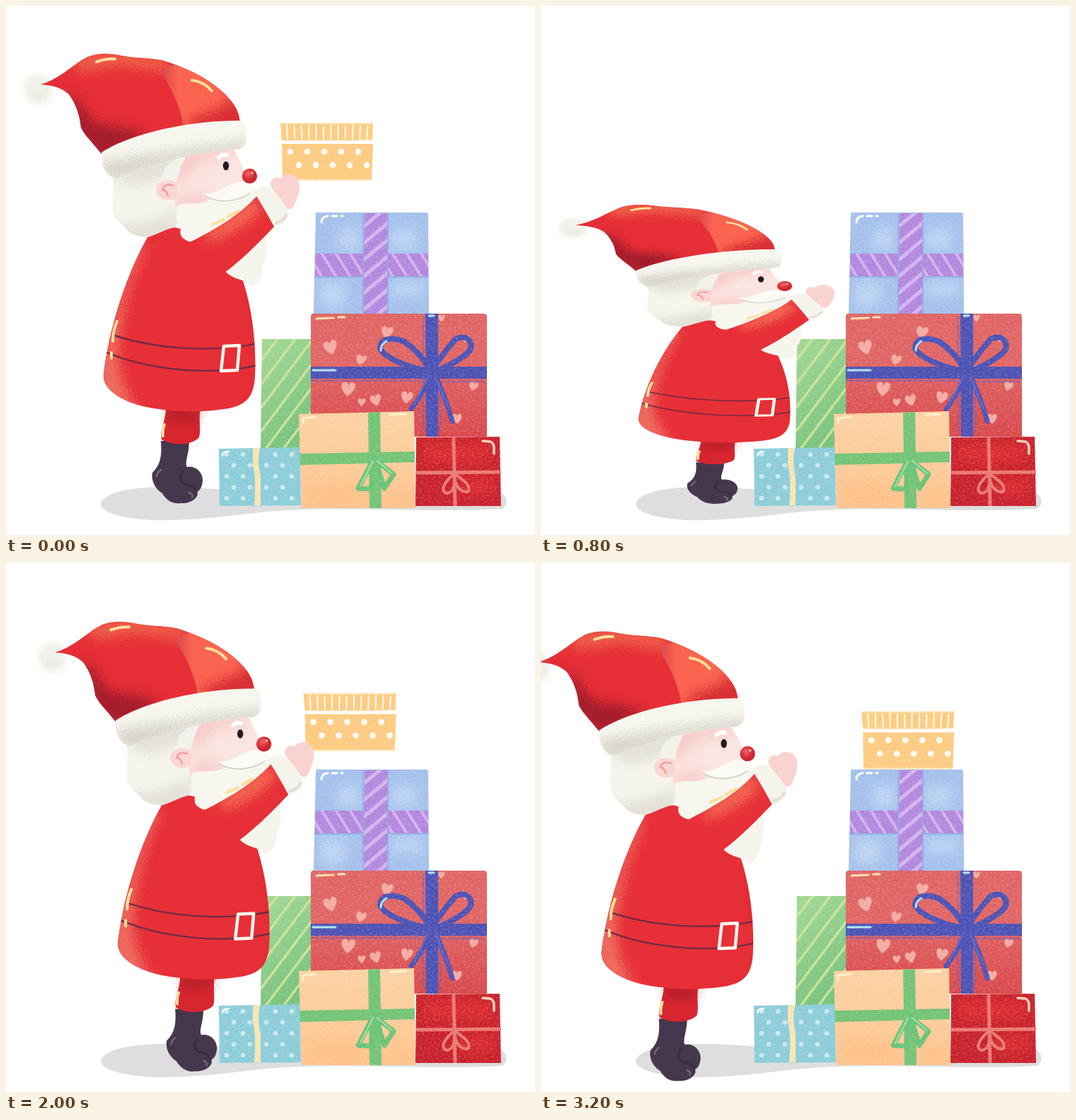
Animation, 748 px wide and 748 px high, one loop 3.4 s. Source, as an HTML page:

```html
<!DOCTYPE html>
<html lang="en">
<head>
<meta charset="utf-8">
<title>Santa stacking presents</title>
<style>
html, body { margin: 0; height: 100%; overflow: hidden; background: #fff; }
svg { display: block; width: 100vw; height: 100vh; }
.line { fill: none; stroke-linecap: round; stroke-linejoin: round; }
.shine { fill: none; stroke: #ffdf9a; stroke-width: 4; stroke-linecap: round; }
.spray { filter: url(#spray); }
.present { filter: url(#paper); }
.cutout { filter: drop-shadow(-1.3px 0 #fff) drop-shadow(0 1.3px #fff); }
</style>
</head>
<body>
<svg viewBox="0 0 748 748">
<defs>
  <filter id="spray" x="-30%" y="-30%" width="160%" height="160%" color-interpolation-filters="sRGB">
    <feGaussianBlur stdDeviation="7" result="soft"/>
    <feTurbulence type="fractalNoise" baseFrequency=".8" numOctaves="2" seed="4"/>
    <feDisplacementMap in="soft" scale="42" xChannelSelector="R" yChannelSelector="G"/>
  </filter>
  <filter id="paper" x="0" y="0" width="100%" height="100%" color-interpolation-filters="sRGB">
    <feTurbulence type="fractalNoise" baseFrequency=".35" numOctaves="3" seed="8"/>
    <feColorMatrix values="0 0 0 0 1  0 0 0 0 1  0 0 0 0 1  .5 0 0 0 -.22"/>
    <feComposite operator="in" in2="SourceGraphic" result="grain"/>
    <feMerge><feMergeNode in="SourceGraphic"/><feMergeNode in="grain"/></feMerge>
  </filter>
  <radialGradient id="pom"><stop offset=".55" stop-color="#f2f1ea"/><stop offset="1" stop-color="#f2f1ea" stop-opacity="0"/></radialGradient>
  <radialGradient id="nose" cx=".4" cy=".35"><stop offset="0" stop-color="#f0686a"/><stop offset=".6" stop-color="#e0353c"/><stop offset="1" stop-color="#c9262f"/></radialGradient>
  <linearGradient id="panel"><stop offset="0" stop-color="#d4444a"/><stop offset=".2" stop-color="#fb6450"/><stop offset=".65" stop-color="#fa6550"/><stop offset="1" stop-color="#e5393b"/></linearGradient>
  <linearGradient id="rose" x2="0" y2="1"><stop offset=".4" stop-color="#e06463"/><stop offset="1" stop-color="#d9474b"/></linearGradient>
  <linearGradient id="leaf" x2=".4" y2="1"><stop offset="0" stop-color="#a3d894"/><stop offset="1" stop-color="#78c17d"/></linearGradient>
  <linearGradient id="peach" x2="0" y2="1"><stop offset="0" stop-color="#fcd2a1"/><stop offset="1" stop-color="#fdc48f"/></linearGradient>
  <pattern id="diag" width="20" height="20" patternUnits="userSpaceOnUse" patternTransform="rotate(37)"><path d="M10 0V20" stroke="#cde595" stroke-width="3.2"/></pattern>
  <pattern id="candyV" width="18" height="18" patternUnits="userSpaceOnUse" patternTransform="translate(506 300) rotate(50)"><path d="M9 0V18" stroke="#d4b5ef" stroke-width="5"/></pattern>
  <pattern id="candyH" width="17" height="17" patternUnits="userSpaceOnUse" patternTransform="translate(437 350) rotate(-32)"><path d="M8 0V17" stroke="#d4b5ef" stroke-width="3.5"/></pattern>
  <path id="heart" d="M0 11C-13 2-11-9-5-9C-1-9 0-5 0-4C1-8 4-11 8-8C13-3 6 5 0 11Z"/>
  <path id="hat" d="M49 111C75 103 90 87 108 76C123 66 146 66 162 70C182 74 202 73 222 77C258 88 288 104 308 123C326 141 331 152 331 172L140 216C126 196 113 186 106 172C104 153 99 139 89 125C77 114 63 112 49 111Z"/>
  <path id="brim" d="M135 207C175 181 255 162 329 162C338 162 341 173 340 184C341 196 336 202 325 203C270 205 205 224 156 243C145 243 132 228 135 207Z"/>
  <path id="hair" d="M149 238C156 258 148 268 151 284C148 300 162 306 170 315C180 331 218 330 236 316C250 304 248 275 240 250L252 210Z"/>
  <path id="coat" d="M200 327C218 322 235 310 243 314L300 330L335 388C350 435 354 485 352 525C350 553 339 564 315 569C275 576 225 574 190 565C158 556 136 540 138 520C146 455 170 380 200 327Z"/>
  <path id="face" d="M250 214C275 206 300 203 322 203C328 212 334 224 337 234L338 258L290 290L240 287C236 260 238 238 250 214Z"/>
  <path id="sleeve" d="M225 345C240 330 252 335 262 333C300 314 335 292 355 268L382 309C355 337 330 364 292 389Z"/>
  <clipPath id="inHat"><use href="#hat"/></clipPath>
  <clipPath id="inBrim"><use href="#brim"/></clipPath>
  <clipPath id="inHair"><use href="#hair"/></clipPath>
  <clipPath id="inCoat"><use href="#coat"/></clipPath>
  <clipPath id="inFace"><use href="#face"/></clipPath>
  <clipPath id="inSleeve"><use href="#sleeve"/></clipPath>
  <clipPath id="residue"><path d="M0 0H748V471H297V748H0Z"/></clipPath>

  <g id="santa">
    <!-- leg -->
    <path fill="#46384c" d="M219 615L259 615C259 634 252 645 256 652C268 649 279 660 278 672C277 681 274 685 270 687C274 692 264 704 248 703C235 705 226 698 221 689C210 682 205 670 207 660C217 650 221 639 219 615Z"/>
    <path class="line" stroke="#352a3b" stroke-width="2.5" d="M250 658C244 668 246 676 257 677C263 678 268 681 269 687"/>
    <path class="line" stroke="#77677c" stroke-width="2.5" d="M259 688Q265 690 263 695M219 656Q213 661 213 665"/>
    <path fill="#d7262f" d="M226 568H275C272 588 276 598 273 610C262 622 235 622 220 613C217 598 226 588 226 568Z"/>
    <path class="spray" fill="#9c1a26" opacity=".6" d="M230 568H272V582Q250 592 230 586Z"/>
    <path class="shine" stroke-width="3" d="M224 592Q221 599 222 608"/>
    <!-- coat, beard below the arm -->
    <use href="#hair" fill="#f6f5ed"/>
    <g clip-path="url(#inHair)"><path class="spray" fill="#d5d2c8" d="M140 235L246 205L246 235L180 256ZM150 310Q200 312 245 285L240 335H165Z" opacity=".6"/></g>
    <use href="#coat" fill="#e72f37"/>
    <g clip-path="url(#inCoat)">
      <path class="spray" fill="#ee6c60" d="M185 330L130 500V555L190 575Q155 530 160 480Q168 400 198 340Z"/>
      <path class="spray" fill="#c2232e" opacity=".5" d="M345 400L360 540L335 572L354 575L368 400Z"/>
      <path class="line" stroke="#742a46" stroke-width="2.4" d="M154 466C215 486 295 490 356 477M143 490C200 514 285 524 356 508"/>
    </g>
    <path class="line" stroke="#fff6ee" stroke-width="4.5" style="fill:#e72f37" d="M308 481L330 480L327 515L304 516Z"/>
    <path class="shine" d="M157 446Q151 460 151 474M149 490V498"/>
    <path fill="#f6f5ed" d="M300 360L310 375C322 389 338 384 347 398C358 392 364 378 362 368C372 355 366 335 367 310L340 310Z"/>
    <!-- head -->
    <use href="#face" fill="#fbe5e1"/>
    <g clip-path="url(#inFace)"><path class="spray" fill="#f5b9b9" opacity=".6" d="M240 205L325 200V211L275 220L250 246L236 250ZM245 268L285 264L280 285H240Z"/></g>
    <path fill="#f3f2ea" d="M225 228Q240 212 256 210Q243 232 240 256Q230 245 216 254Z"/>
    <path fill="#fad6d2" d="M242 250C226 241 211 250 212 261C214 273 229 278 241 271Z"/>
    <path class="line" stroke="#ed9f9e" stroke-width="2.5" d="M236 254Q224 250 221 260Q226 259 229 268"/>
    <path fill="#f7f6ef" d="M242 283C256 275 275 284 290 273L350 258C365 270 350 289 330 302C305 320 280 329 262 334C248 330 245 324 247 315C238 306 243 296 242 283Z"/>
    <path fill="#fbfaf4" d="M278 264C296 270 312 250 334 248C352 249 354 260 343 266C325 280 292 278 278 264Z"/>
    <path class="line" stroke="#d9d4cc" stroke-width="2" d="M281 268C300 280 326 277 345 265"/>
    <path class="line" stroke="#fff" stroke-width="6" d="M301 214Q305 209 312 211"/>
    <ellipse cx="311" cy="226" rx="4.2" ry="6.3" fill="#241924"/>
    <circle cx="344.5" cy="240.5" r="10.6" fill="url(#nose)"/>
    <circle cx="348" cy="236" r="1.8" fill="#fbb9b5"/>
    <!-- arm -->
    <use href="#sleeve" fill="#e72f37"/>
    <g clip-path="url(#inSleeve)"><path class="spray" fill="#f46a55" d="M278 325L350 270L362 288Q335 316 288 334Z"/></g>
    <path class="shine" d="M292 309L308 302M314 298L328 290"/>
    <path fill="#f9d3d0" d="M376 258C370 248 379 239 388 244C393 235 407 236 413 246C418 257 413 269 409 278C406 286 402 289 397 286Z"/>
    <path fill="#f5f4ec" d="M351 264C356 256 368 253 375 259C387 270 398 284 400 294C398 304 388 312 379 312C371 297 362 281 351 264Z"/>
    <path class="line" stroke="#d6d1c7" stroke-width="4" opacity=".6" d="M381 307Q392 305 396 296"/>
    <!-- hat -->
    <circle cx="45" cy="115" r="25" fill="url(#pom)"/>
    <path class="spray" fill="#c7c3b8" opacity=".5" d="M32 120Q42 137 62 123L58 136H36Z"/>
    <use href="#hat" fill="#e72f37"/>
    <g clip-path="url(#inHat)">
      <path class="spray" fill="#ef6049" d="M90 72L160 60L225 72L240 95L160 84L105 94Z"/>
      <path class="spray" fill="#92192a" d="M62 104L100 130L125 166L200 178L138 218L98 180L88 120Z" opacity=".8"/>
      <path fill="url(#panel)" d="M218 92L250 78L345 120V182H252Q250 140 218 92Z"/>
      <path class="spray" fill="#d92f35" d="M260 160L350 125V180H260Z"/>
    </g>
    <path class="shine" d="M128 79Q142 74 154 75M263 105Q280 107 291 120"/>
    <use href="#brim" fill="#f7f6ef"/>
    <g clip-path="url(#inBrim)"><path class="spray" fill="#cbc8bd" opacity=".75" d="M130 222Q230 205 342 190V206L230 222L150 250Z"/></g>
  </g>
</defs>

<path fill="#dedede" d="M134 704C138 686 185 679 235 680C310 681 360 692 430 692L700 689C710 693 710 708 700 711C610 716 500 709 418 712C350 714 300 726 230 727C180 728 134 719 134 704Z"/>
<use id="ghost" href="#santa" clip-path="url(#residue)"/>
<g id="violet" class="present">
  <path fill="#a3c0ec" d="M438 292H594Q597 292 597 296L598 435H435Z"/>
  <path class="spray" fill="#cfe2f6" opacity=".6" d="M470 315H500V345H470ZM545 315H580V345H545ZM445 390H480V425H445ZM545 390H590V410H545Z"/>
  <path fill="#b286de" d="M437 350H597V382H437Z"/><path fill="url(#candyH)" d="M437 350H597V382H437Z"/>
  <path fill="#b286de" d="M507 293H540L539 435H505Z"/><path fill="url(#candyV)" d="M507 293H540L539 435H505Z"/>
  <path class="line" stroke="#8aa8dc" stroke-width="1.5" d="M436 383H505M540 383H598M505 294V435M540 294V435"/>
  <path class="line" stroke="#fff" stroke-width="3" d="M446 306Q446 298 455 297M461 297H468M474 297H476"/>
</g>
<g id="scarlet" class="present">
  <path fill="url(#rose)" d="M433 435H676Q680 435 680 440V609H431V438Z"/>
  <g id="hearts" fill="#f4aaa3"></g>
  <path fill="#4b51b4" d="M593 435H611V609H594ZM430 510H680V527H430Z"/>
  <path class="line" stroke="#6a5dba" stroke-width="2.5" opacity=".5" d="M432 530H590M615 531H676M590 440V600M614 540V603"/>
  <path class="line" stroke="#4b51b4" stroke-width="8" d="M600 517C572 512 535 498 529 484C529 470 545 468 562 474Q582 486 602 517Q618 490 636 471C650 464 660 473 657 485Q650 498 603 519"/>
  <path class="line" stroke="#4b51b4" stroke-width="7" d="M600 520Q593 543 573 570M605 520Q620 548 631 587"/>
  <path class="line" stroke="#6c6ec7" stroke-width="2" opacity=".7" d="M598 522L578 563M607 524L626 570"/>
  <path class="line" stroke="#ffdfaa" stroke-width="3" d="M439 442L463 441M470 440H479"/>
  <path class="line" stroke="#aee5ef" stroke-width="3" d="M530 487Q530 478 538 474M598 438H605M434 515H466"/>
</g>
<g id="base">
  <g class="present">
    <path fill="url(#leaf)" d="M362 471H431V625H360Z"/><path fill="url(#diag)" d="M362 471H431V625H360Z"/>
  </g>
  <g class="present">
    <path fill="#8bccd9" d="M301 626L416 624L417 706L302 707Z"/>
    <g id="dots" fill="#c9e9ea"></g>
    <path fill="#f6e5b1" d="M349 625H359Q355 645 360 665V706H351Q354 665 349 650Z"/>
    <path class="line" stroke="#fff" stroke-width="2.5" d="M306 636Q306 630 315 630"/>
  </g>
  <g class="present">
    <path fill="url(#peach)" d="M414 577L577 573L579 710H418Z"/>
    <path class="spray" fill="#fdb877" d="M425 675H505V705H425ZM540 685H574V705H540Z" opacity=".4"/>
    <path fill="#72c375" d="M512 575L529 574L531 710H514ZM415 633L578 630V645L416 649Z"/>
    <path class="line" stroke="#69c276" stroke-width="7" d="M521 638L498 682L516 683L522 642L548 662L535 682L522 640"/>
    <path class="line" stroke="#a8dda0" stroke-width="2" d="M519 643L501 679M525 643L546 661"/>
    <path class="line" stroke="#fff0cd" stroke-width="3" d="M420 590V583L438 581M543 578L565 577"/>
  </g>
  <g class="present">
    <path fill="#c8202a" d="M580 610L698 609L700 707H579Z"/>
    <path class="spray" fill="#de2b31" d="M590 620H685V645H590ZM645 670H690V690H645Z"/>
    <path class="line" stroke="#ec7773" stroke-width="5" d="M581 660L699 659M633 612L635 705"/>
    <path class="line" stroke="#ec7773" stroke-width="4" d="M634 661C620 673 612 687 624 689C635 687 635 672 634 661C634 676 641 688 653 687C660 678 643 668 634 661"/>
    <path class="line" stroke="#ffd0b5" stroke-width="3.5" d="M674 615L685 616Q690 618 690 626V633"/>
  </g>
</g>
<g id="yellow" class="present">
  <path fill="#fccb80" d="M388 166L519 165L518 190H390ZM390 195H519L517 247H391Z"/>
  <path fill="none" stroke="#ffe7bd" stroke-width="2" d="M389 166L518 166M391 246H517"/>
  <path id="bars" class="line" stroke="#fff6e6" stroke-width="2.2"/>
  <path class="line" stroke="#fffdf6" stroke-width="4" d="M390 192Q455 194 518 191"/>
  <g id="spots" fill="#fffaf0"></g>
</g>
<use id="hero" href="#santa"/>
</svg>
<script>
const $ = id => document.getElementById(id);
const STEP = 200, COUNT = 17, GROUND = 705;
const growth = [1, .546, .546, .602, .665, .734, .817, .903];

const disc = (x, y, r) => `<circle cx="${x}" cy="${y}" r="${r}"/>`;
const range = n => [...Array(n).keys()];

$('hearts').innerHTML = [
  [459, 482, 1, -15], [502, 500, .75, 15], [539, 461, .85, 10], [484, 541, 1, 5], [523, 557, .8, -15],
  [503, 560, .55, 0], [567, 553, .85, 10], [650, 470, .55, 10], [661, 537, .65, 20],
  [638, 583, .7, 0], [616, 441, .5, 0]
].map(([x, y, s, a]) =>
  `<use href="#heart" transform="translate(${x} ${y}) rotate(${a}) scale(${s})"/>`).join('');

$('dots').innerHTML = range(25).map(i => {
  const row = i / 5 | 0, x = 312 + i % 5 * 23 + row % 2 * 10;
  return Math.abs(x - 354) < 9 || x > 413 ? '' : disc(x, 634 + row * 15.5, 3.3);
}).join('');

$('spots').innerHTML = range(10).map(i =>
  disc(402 + i * 12, 206 + i % 2 * 19, 4.4)).join('');

$('bars').setAttribute('d', range(12).map(i =>
  `M${397 + i * 10.4} ${168 + i % 3}L${398 + i * 10.2} 188`).join(''));

const place = (node, x, y, s) =>
  node.setAttribute('transform', `translate(${x} ${y + GROUND * (1 - s)}) scale(1 ${s})`);
const show = (node, on) => node.style.display = on ? '' : 'none';

function draw(i) {
  const near = Math.min(Math.max(i - 8, 0), 4);   // stepping towards the pile
  const back = Math.max(i - 12, 0);               // sliding away again
  place($('hero'), near * 10.1 - back * 23.2, near * 7.8 - back * .5, growth[i] ?? 1);
  place($('ghost'), 0, 0, growth[1]);
  show($('ghost'), i === 3);
  $('hero').setAttribute('class', i === 3 ? 'cutout' : '');

  show($('base'), i !== 1);
  show($('scarlet'), i === 0 || i > 2);
  show($('violet'), i === 0 || i > 3);
  show($('yellow'), i === 0 || i > 7);
  $('yellow').setAttribute('transform',
    i ? `translate(${near * 16.3} ${near * 12.9 - 7})` : '');
}

let last = -1;
function tick(now) {
  const i = Math.floor(now / STEP) % COUNT;
  if (i !== last) draw(last = i);
  requestAnimationFrame(tick);
}
draw(0);
requestAnimationFrame(tick);
</script>
</body>
</html>
```
